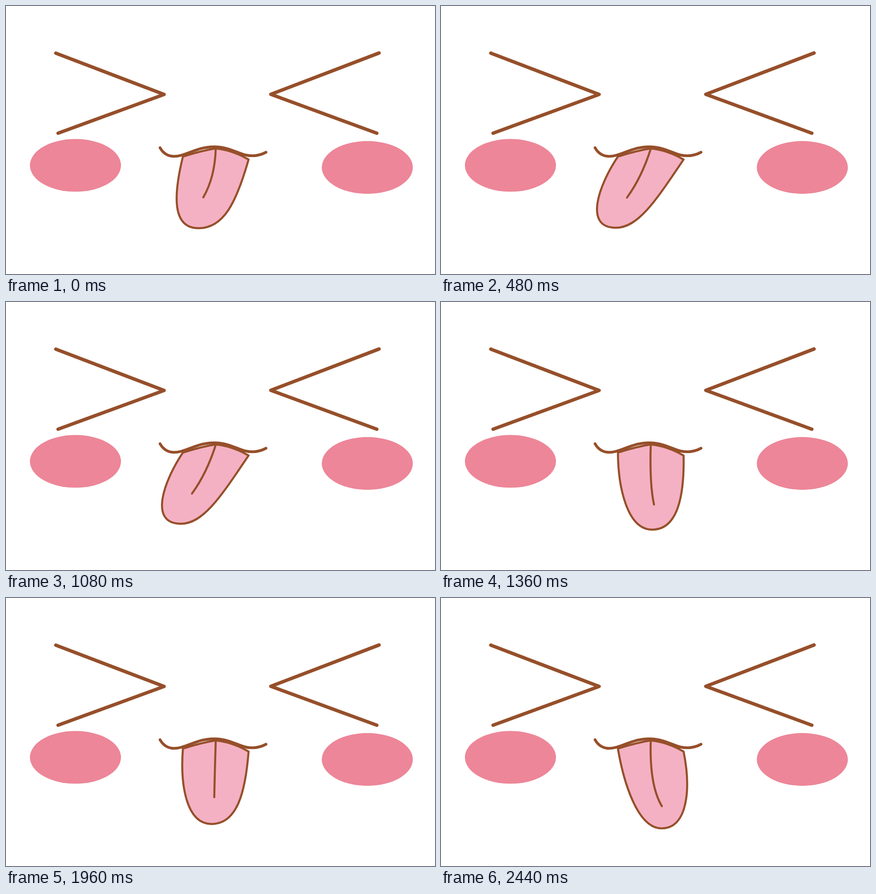
An HTML page for the animation above (2.48 s loop, 947 by 591 pixels).

```html
<!DOCTYPE html>
<html lang="en">
<head>
<meta charset="utf-8">
<title>Cheeky face</title>
<style>
  html, body { margin: 0; width: 100%; height: 100%; overflow: hidden; background: #fff; }
  svg { display: block; width: 100%; height: 100%; }
  .line { fill: none; stroke: #964f2a; stroke-linecap: round; stroke-linejoin: round; }
</style>
</head>
<body>
<svg viewBox="0 0 947 591">
  <g fill="#ed8698">
    <ellipse cx="153.3" cy="351.4" rx="100.5" ry="58.2"/>
    <ellipse cx="797.6" cy="356" rx="100.5" ry="58.2"/>
  </g>
  <g class="line" stroke-width="7.6">
    <path d="M110 104L349 195L115 280.5"/>
    <path d="M823.5 103.6L584.6 194.8L818.5 280.5"/>
  </g>
  <path id="tongue" class="line" style="fill:#f4b1c3" stroke-width="4.5"/>
  <path id="crease" class="line" stroke-width="4.5"/>
  <path class="line" stroke-width="6" d="M340 312.5C347 325 356 331 370 331.5C397 332 421 310 460 310.5C490 310.5 510 324 528 328.5C543 332 560 330 574 322.5"/>
</svg>
<script>
const LOOP = 2480, STEP = 40;

// Key poses: left side handle, left tip handle x, tip, right tip handle x,
// right side handle, crease bend, crease end.
const rest  = [369, 420, 367, 425, 490, 480, 508, 435, 461, 378, 435.5, 422];
const right = [402, 400, 432, 487, 508, 545, 552, 420, 460, 413, 487.5, 459];
const swing = [362, 405, 352, 411, 498, 470, 504, 435, 452, 395, 422, 438];
const left  = [350, 392, 313, 386, 489, 436, 475, 428, 443, 378, 410.5, 422.5];

// Share of a lick spent reaching right, and of the way left where "swing" lies.
const TURN = 3 / 7, BEND = 0.75;

// Licks: start, wait at rest, time to reach the left.
const licks = [
  [0, 0, 480], [520, 0, 560], [1120, 80, 560], [1800, 120, 200], [2160, 40, 560]];

const tongue = document.getElementById("tongue");
const crease = document.getElementById("crease");

function phaseAt(t) {
  const [start, wait, length] = licks.filter(l => l[0] <= t).pop();
  return Math.min(1, Math.max(0, (t - start - wait) / length));
}

function poseAt(p) {
  if (p <= TURN) return rest.map((v, i) => v + (right[i] - v) * p / TURN);
  // A parabola through three poses gives the swing its arc.
  const s = (p - TURN) / (1 - TURN);
  const a = (s - BEND) * (s - 1) / BEND;
  const c = s * (s - BEND) / (1 - BEND);
  return right.map((v, i) => a * v + (1 - a - c) * swing[i] + c * left[i]);
}

function draw(t) {
  const [lx, ly, tl, x, y, tr, rx, ry, bx, by, ex, ey] = poseAt(phaseAt(t));
  tongue.setAttribute("d",
    `M390.5 332C${lx} ${ly} ${tl} ${y} ${x} ${y}` +
    `C${tr} ${y} ${rx} ${ry} 535.5 338.5Q500 318 463 314Q432 319 390.5 332Z`);
  crease.setAttribute("d", `M463 315Q${bx} ${by} ${ex} ${ey}`);
}

const begin = performance.now();
function tick() {
  const t = (performance.now() - begin) % LOOP;
  draw(Math.floor(t / STEP) * STEP);
  requestAnimationFrame(tick);
}
draw(0);
requestAnimationFrame(tick);
</script>
</body>
</html>
```
